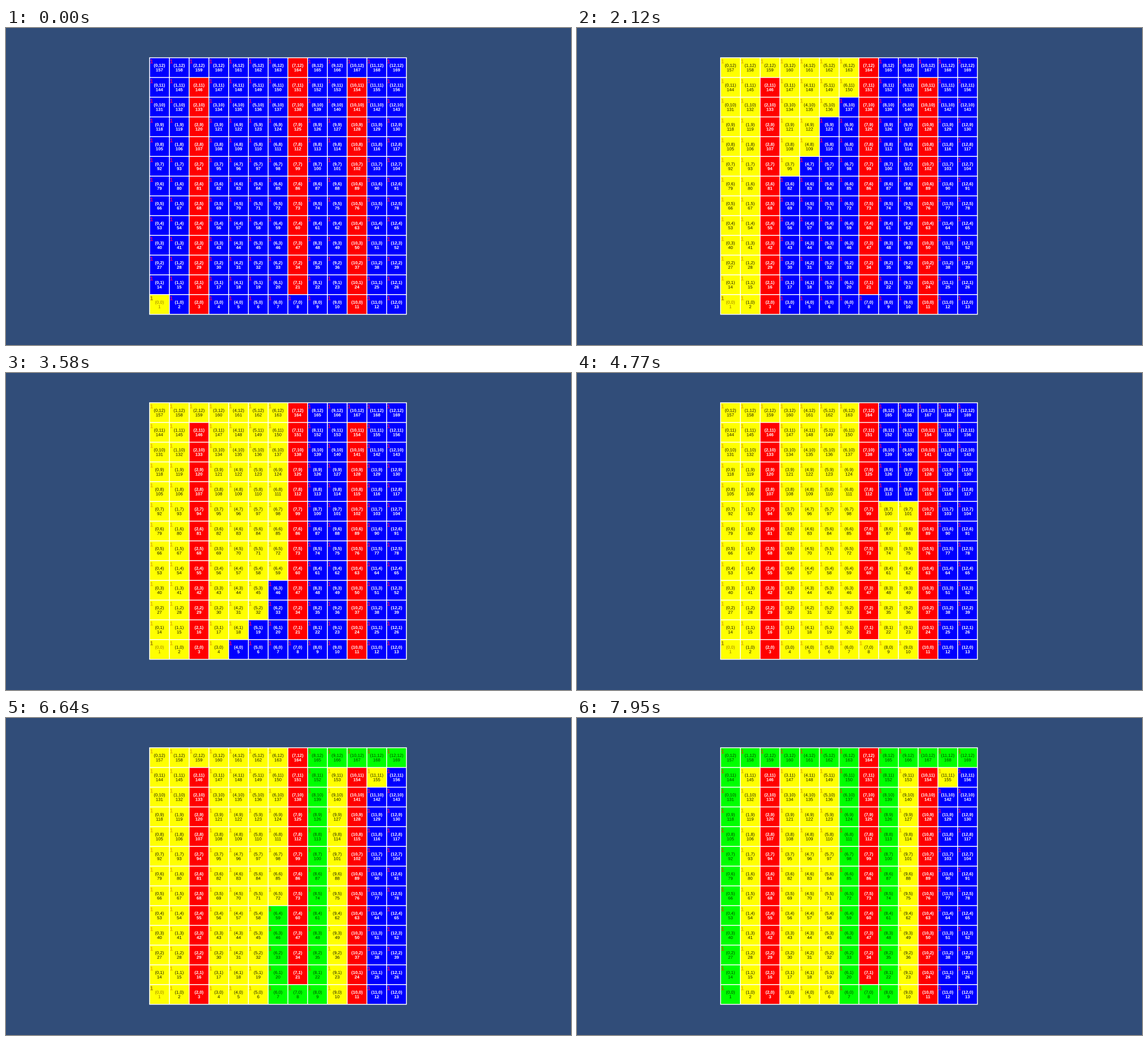
These frames come from a looping animation (999x561 px, 8350 ms). A matplotlib script:

```python
from collections import deque

import matplotlib.pyplot as plt
from matplotlib.animation import FuncAnimation
from matplotlib.collections import PathCollection
from matplotlib.patches import Rectangle
from matplotlib.path import Path
from matplotlib.textpath import TextPath

W, H, DPI = 999, 561, 64
LOOP, TICK = 8350, 25           # ms
N, LEFT, BOTTOM, PITCH, GAP = 13, 253.9, 54.3, 34.93, 1.5
STEP, LAST = 66.25, 120         # picture period in ms, final picture
RATE, LEAD = 1.318, 0.5         # cells coloured per picture

OPEN, WALL, SEEN, ROUTE = range(4)
FILL = ["#0000ff", "#ff0000", "#ffff00", "#00ff00"]
INK = ["#ffffff", "#ffffff", "#141400", "#003c00"]
MARK = ["#e60070", "#ff0000", "#e6b400", "#be5a00"]
START_INK, START_MARK = "#967800", "#a07800"

cells = [(x, y) for y in range(N) for x in range(N)]
start, goal = (0, 0), (N - 1, N - 1)
walls = {(x, y) for x in (2, 10) for y in range(N - 1)}
walls |= {(7, y) for y in range(1, N)}

DOWN, RIGHT, UP, SIDE = (0, -1), (1, 0), (0, 1), (-1, 0)


def neighbours(cell, order):
    for dx, dy in order:
        near = cell[0] + dx, cell[1] + dy
        if 0 <= near[0] < N and 0 <= near[1] < N and near not in walls:
            yield near


def flood():
    """Breadth-first distances, keyed in visiting order, up to the goal."""
    dist, queue = {start: 0}, deque([start])
    while goal not in dist:
        cell = queue.popleft()
        for near in neighbours(cell, (DOWN, RIGHT, UP, SIDE)):
            if near not in dist:
                dist[near] = dist[cell] + 1
                queue.append(near)
    return dist


def trace(dist):
    """Walk back from the goal along falling distances."""
    route = [goal]
    while route[-1] != start:
        cell = route[-1]
        route.append(next(n for n in neighbours(cell, (UP, SIDE, DOWN, RIGHT))
                          if dist.get(n) == dist[cell] - 1))
    return route


dist = flood()
visits, route = list(dist), trace(dist)


def text_at(s, x, y, size, weight):
    """Text outline centred on x with its digits centred on y."""
    glyphs = TextPath((0, 0), s, size=size,
                      prop=dict(family="Liberation Sans", weight=weight))
    box = glyphs.get_extents()
    shift = [x - (box.x0 + box.x1) / 2, y - 0.35 * size]
    return Path(glyphs.vertices + shift, glyphs.codes)


def label(cell, weight):
    x, y = cell
    cx, cy = LEFT + (x + 0.5) * PITCH, BOTTOM + (y + 0.5) * PITCH
    return Path.make_compound_path(
        text_at(f"({x},{y})", cx, cy + 4, 7.7, weight),
        text_at(str(y * N + x + 1), cx, cy - 4, 7.7, weight))


def corner_mark(cell):
    x, y = cell
    return text_at("1", LEFT + x * PITCH + 3.6,
                   BOTTOM + (y + 1) * PITCH - 6.4, 10, "bold")


def square(cell):
    x, y = (o + c * PITCH + GAP / 2 for o, c in zip((LEFT, BOTTOM), cell))
    side = PITCH - GAP
    return Path([(x, y), (x + side, y), (x + side, y + side), (x, y + side),
                 (x, y)], closed=True)


bold = [label(c, "bold") for c in cells]
thin = [label(c, "normal") for c in cells]

fig = plt.figure(figsize=(W / DPI, H / DPI), dpi=DPI, facecolor="#314d79")
ax = fig.add_axes([0, 0, 1, 1])
ax.set(xlim=(0, W), ylim=(0, H))
ax.axis("off")

edge = N * PITCH + GAP
ax.add_patch(Rectangle((LEFT - GAP / 2, BOTTOM - GAP / 2), edge, edge,
                       facecolor="white", linewidth=0, snap=False))


def layer(paths, z):
    shapes = PathCollection(paths, linewidths=0, edgecolors="none", zorder=z)
    shapes.set_snap(False)
    ax.add_collection(shapes, autolim=False)
    return shapes


squares = layer([square(c) for c in cells], 2)
marks = layer([corner_mark(c) for c in cells], 3)
labels = layer(bold, 4)


def states(count):
    """State of every cell after `count` colourings."""
    state = {c: WALL if c in walls else OPEN for c in cells}
    state.update((c, SEEN) for c in visits[:count + 1])
    found = max(0, count + 1 - len(visits))
    state.update((c, ROUTE) for c in route[:found])
    return [state[c] for c in cells]


def update(i):
    picture = min(LAST, int((i * TICK + TICK - 1) / STEP))
    now = states(int(RATE * picture + LEAD))
    inks = [INK[s] for s in now]
    tints = [MARK[s] for s in now]
    if now[0] == SEEN:
        inks[0], tints[0] = START_INK, START_MARK
    squares.set_facecolor([FILL[s] for s in now])
    marks.set_facecolor(tints)
    labels.set_paths([t if s >= SEEN else b
                      for s, b, t in zip(now, bold, thin)])
    labels.set_facecolor(inks)
    return squares, marks, labels


anim = FuncAnimation(fig, update, frames=LOOP // TICK, interval=TICK,
                     repeat=True, repeat_delay=0)
plt.show()
```
